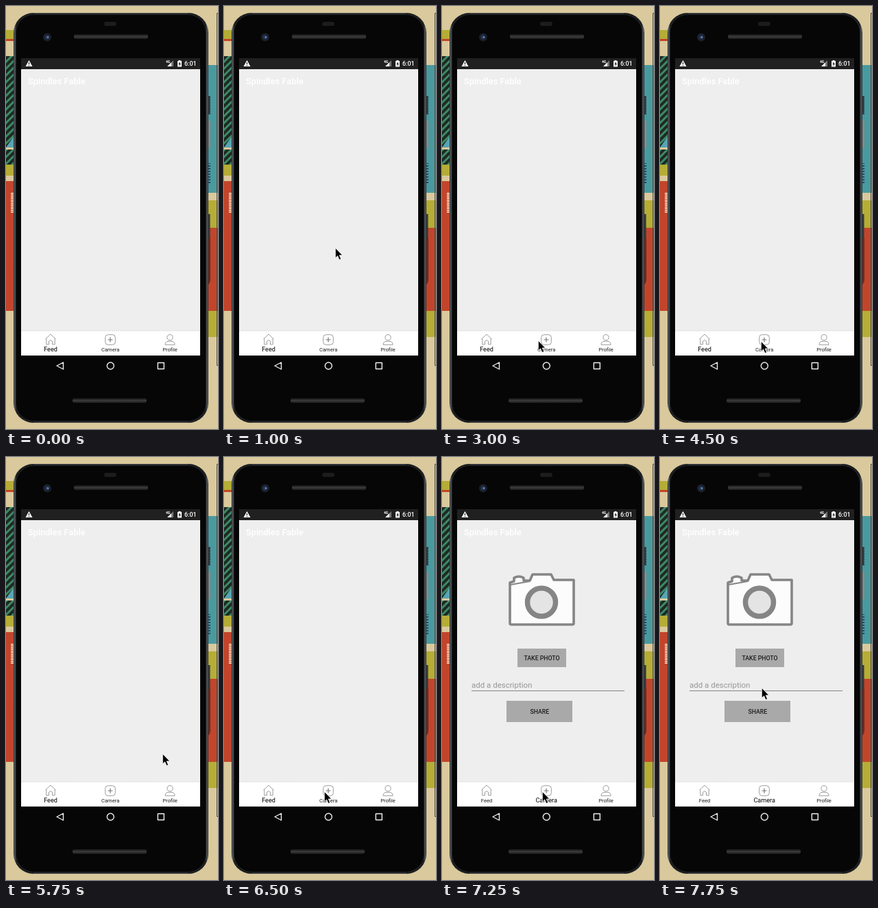
Write an HTML page that moves like this. It is 309 by 616 pixels and loops after 8000 ms.

```html
<!DOCTYPE html>
<html lang="en">
<head>
<meta charset="utf-8">
<title>Phone demo</title>
<style>
  html, body { margin: 0; width: 100%; height: 100%; overflow: hidden; background: #d9c99c; }
  svg { display: block; width: 100%; height: 100%; }
  text { font-family: Roboto, Arial, sans-serif; }
  .medium { font-weight: 500; }
  .mid { text-anchor: middle; }
  .icon { fill: none; stroke: #929292; stroke-width: .9; stroke-linejoin: round; }
  .nav { fill: none; stroke: #eee; stroke-width: 1.4; stroke-linejoin: round; }
  .label { font-size: 7.6px; fill: #1c1c1c; }
  .label.active { font-size: 9.1px; fill: #000; }
</style>
</head>
<body>
<svg viewBox="0 0 309 616">
  <defs>
    <pattern id="greenHatch" width="7" height="7" patternUnits="userSpaceOnUse" patternTransform="rotate(45)">
      <path d="M0 0H7V7H0Z" fill="#1d2a26"/><path d="M0 0H3V7H0Z" fill="#3f8a63"/>
    </pattern>
    <pattern id="blueHatch" width="4" height="4" patternUnits="userSpaceOnUse">
      <path d="M0 0H4V2H0Z" fill="#234a6c"/>
    </pattern>
    <linearGradient id="rim">
      <stop offset="0" stop-color="#25282b"/><stop offset=".006" stop-color="#575d62"/>
      <stop offset=".014" stop-color="#1b1d1f"/><stop offset=".986" stop-color="#1b1d1f"/>
      <stop offset=".994" stop-color="#575d62"/><stop offset="1" stop-color="#25282b"/>
    </linearGradient>
    <linearGradient id="slot" x2="0" y2="1">
      <stop offset="0" stop-color="#111"/><stop offset=".5" stop-color="#3b3b3b"/><stop offset="1" stop-color="#1c1c1c"/>
    </linearGradient>
    <clipPath id="tabBar"><path d="M22 473H283V509H22Z"/></clipPath>
    <filter id="soft"><feGaussianBlur stdDeviation=".7"/></filter>
  </defs>

  <!-- wallpaper -->
  <path fill="#d9c99c" d="M0 0H309V616H0Z"/>
  <path fill="#b5ad35" d="M0 35H14V48H0ZM0 231H14V247H0ZM292 283H309V323H292ZM292 444H309V482H292Z"/>
  <path fill="#c2452b" d="M0 48H14V51H0ZM0 255H14V444H0ZM292 323H309V444H292Z"/>
  <path fill="url(#greenHatch)" d="M0 73H14V231H0Z"/>
  <path fill="#57a5b5" d="M0 206L14 186V206Z"/>
  <path fill="#d9c99c" d="M0 206H14V209H0Z"/>
  <path fill="#489a9f" d="M292 86H309V272H292Z"/>
  <path fill="url(#blueHatch)" d="M292 130H298V158H292ZM292 229H298V258H292Z"/>
  <path stroke="#eee3cc" stroke-width="4" stroke-dasharray="1.5 1" d="M9 272V301"/>
  <path fill="none" stroke="#4b4638" d="M309 10.5H307.5V523.5H309"/>

  <!-- phone -->
  <path fill="#6b2a1e" d="M292 338H298V398Q298 405 292 407Z"/>
  <path fill="#34383b" d="M293 131H297.5V157H293ZM293 303H297.5V338H293Z"/>
  <path fill="#85898a" d="M293 167H298V207H293Z"/>
  <rect x="11" y="10" width="284" height="597" rx="29" fill="url(#rim)"/>
  <rect x="14.5" y="12.5" width="277" height="592" rx="26" fill="#060606" stroke="#222426"/>
  <path fill="none" stroke="#4a4e51" d="M40 606.3H266M40 10.6H266"/>
  <rect x="99" y="41" width="108" height="7" rx="3" fill="url(#slot)"/>
  <rect x="97" y="571" width="108" height="7" rx="3" fill="url(#slot)"/>
  <rect x="143" y="23" width="18" height="6" rx="3" fill="#1c1c1c"/>
  <circle cx="60" cy="45.5" r="6" fill="#1b2029"/>
  <circle cx="60" cy="45.5" r="3" fill="#24375f"/>
  <circle cx="61" cy="45.5" r="1.2" fill="#8393b5"/>

  <!-- status bar and header -->
  <path fill="#eee" d="M22 76H283V509H22Z"/>
  <path fill="#202020" d="M22 76H283V92H22Z"/>
  <path fill="#fff" d="M33.5 79L38.5 88H28.5Z"/>
  <path stroke="#202020" stroke-width="1.2" d="M33.5 82V85M33.5 86V87.2"/>
  <text x="233" y="83" font-size="5" font-weight="700" fill="#fff">4G</text>
  <path fill="#fff" d="M235 88L241 82V88Z"/>
  <path fill="#777" d="M241 82L244 79V88H241Z"/>
  <path fill="#fff" d="M250 80H251.5V79H254.5V80H256V88.5H250Z"/>
  <path fill="#202020" d="M253.6 81L251.3 84.8H252.8V87.5L255 83.7H253.6Z"/>
  <text class="medium" x="260" y="87" font-size="9" fill="#fff">6:01</text>
  <text class="medium" x="32" y="114" font-size="12.8" fill="#fff">Spindles Fable</text>

  <!-- camera page -->
  <g id="cameraPage">
    <g filter="url(#soft)" stroke="#858585" stroke-linejoin="round">
      <path fill="#fcfcfc" stroke-width="3.6" d="M99 183L105 181V176Q112 172 119 176V180H128L132 171H159L163 179H192V242Q192 244 190 244H101Q99 244 99 242Z"/>
      <path fill="none" stroke-width="2" d="M100 186L128 181"/>
      <circle cx="145" cy="211.5" r="20.5" fill="#e4e4e4" stroke-width="7.5"/>
    </g>
    <path fill="#a9a9a9" d="M110 279H181V306H110ZM94 355H190V386H94Z"/>
    <g class="medium mid" font-size="8.75" fill="#1d1d1d">
      <text x="145.5" y="295.5">TAKE PHOTO</text>
      <text x="142.3" y="374">SHARE</text>
    </g>
    <text x="43" y="336" font-size="11.5" fill="#979797">add a description</text>
    <path stroke="#858585" d="M43 340.5H266"/>
  </g>

  <!-- tabs -->
  <path fill="#fff" d="M22 473H283V509H22Z"/>
  <path stroke="#d8d8d8" stroke-dasharray="2 1" d="M22 473H283"/>
  <circle id="ripple" cx="152" cy="487" clip-path="url(#tabBar)"/>
  <g class="icon">
    <path d="M57.5 485L65 478L72.5 485M58.8 484V492.8H62.5V488Q65 485 67.5 488V492.8H71.2V484"/>
    <rect x="144.7" y="478.7" width="14.6" height="14.6" rx="4"/>
    <path stroke-width="1.2" stroke="#777" d="M148.5 486H155.5M152 482.5V489.5"/>
    <circle cx="239" cy="482.7" r="4.1"/>
    <path d="M232 493.3Q232 488.3 237 488.3H241Q246 488.3 246 493.3Z"/>
  </g>
  <g class="mid">
    <text id="feed" class="label" x="65" y="502.7">Feed</text>
    <text id="camera" class="label" x="152.2" y="502.7">Camera</text>
    <text class="label" x="239" y="502.7">Profile</text>
  </g>

  <!-- navigation keys -->
  <g class="nav">
    <path d="M83.5 519V529L74 524Z"/>
    <circle cx="152.3" cy="524" r="5"/>
    <path d="M221.3 519.5H230.3V528.5H221.3Z"/>
  </g>

  <path id="cursor" fill="#000" stroke="#fff" stroke-width=".8" d="M.3 .3V15L3.6 11.9L6 17.5L8.6 16.4L6.2 11H10.7Z"/>
</svg>
<script>
  const LOOP = 8000;
  const PAGE_OPENS = 6750, TAB_SWITCHES = 7000, RIPPLE_ENDS = 7250;

  // [start time, x, y]: the pointer jumps and rests at each place
  const pointerStops = [
    [500, 302, 82], [750, 170, 331], [1000, 162, 352], [1250, 153, 423],
    [1500, 148, 440], [2250, 216, 352], [2500, 143, 454], [2750, 129, 467],
    [3000, 140, 487], [3750, 158, 489], [4000, 149, 489], [4250, 146, 489],
    [4500, 147, 488], [5750, 228, 432], [6000, 167, 435], [6250, 150, 478],
    [6500, 146, 487], [7500, 158, 341], [7750, 148, 336]
  ];

  const el = id => document.getElementById(id);
  const show = (id, visible) => el(id).setAttribute('visibility', visible ? 'visible' : 'hidden');

  function draw(now) {
    const t = now % LOOP;
    const stop = pointerStops.findLast(([start]) => start <= t);
    show('cursor', stop);
    if (stop) el('cursor').setAttribute('transform', `translate(${stop[1]} ${stop[2]})`);

    const switched = t >= TAB_SWITCHES;
    show('cameraPage', t >= PAGE_OPENS);
    show('ripple', t >= PAGE_OPENS && t < RIPPLE_ENDS);
    el('ripple').setAttribute('r', switched ? 46 : 16.5);
    el('ripple').setAttribute('fill', switched ? '#f2f2f2' : '#ebebeb');
    el('feed').classList.toggle('active', !switched);
    el('camera').classList.toggle('active', switched);
    requestAnimationFrame(draw);
  }

  const begin = performance.now();
  draw(0);
  function draw0() {}
</script>
</body>
</html>
```
